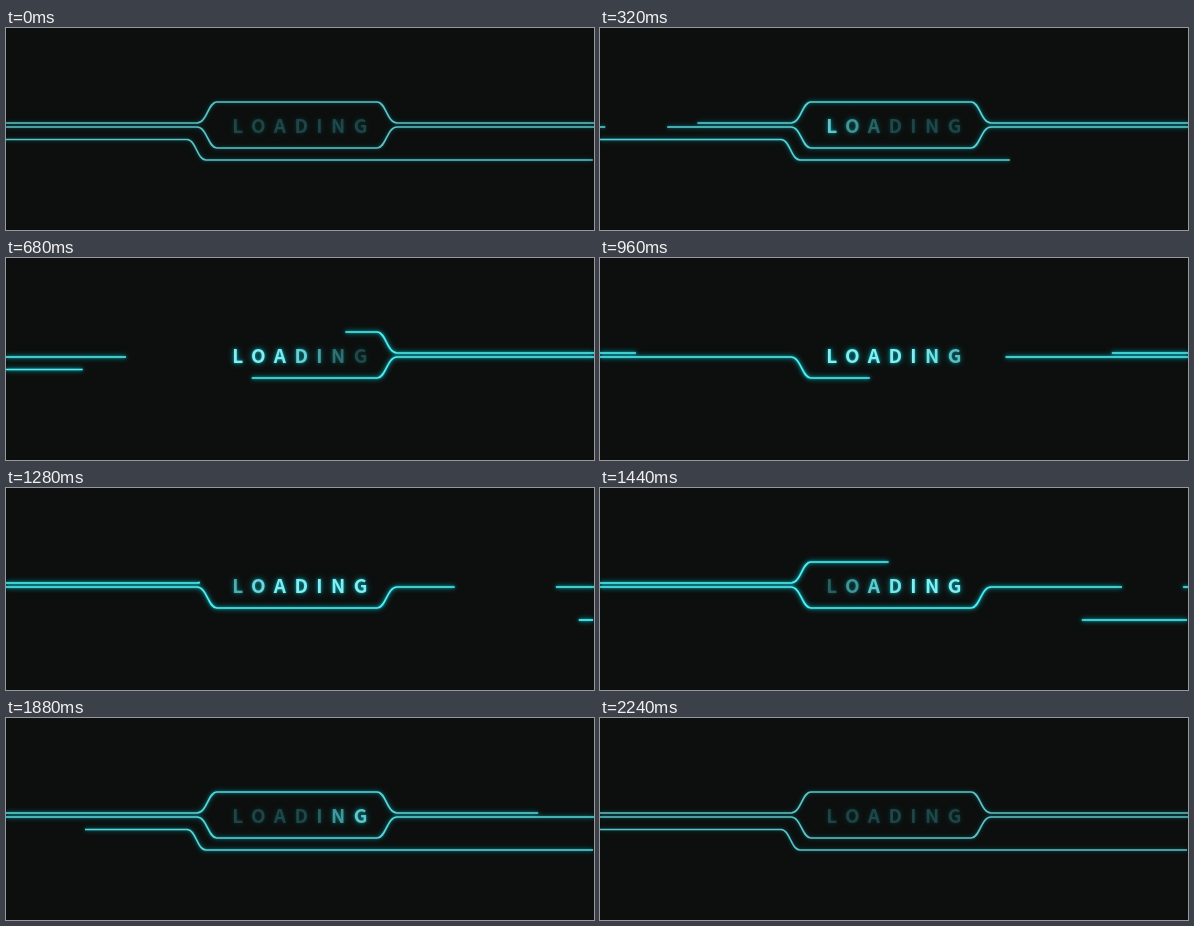
Write an HTML page that moves like this. It is 588 px wide and 202 px high and loops after 2.4 s.

```html
<!DOCTYPE html>
<html lang="en">
<head>
<meta charset="utf-8">
<title>Loading</title>
<style>
  html, body { margin: 0; width: 100%; height: 100%; overflow: hidden; background: #0c0f0e; }
  svg { display: block; }
  path { fill: none; stroke-width: 1.7; }
  text {
    font: bold 19px "Noto Sans CJK SC", "Noto Sans CJK JP", "Noto Sans CJK", "Open Sans", sans-serif;
    letter-spacing: 8.4px;
    fill: #86eef2;
    filter: drop-shadow(0 0 1.5px rgba(0, 205, 215, .7)) drop-shadow(0 0 3px rgba(0, 205, 215, .5));
  }
</style>
</head>
<body>
<svg width="588" height="202" viewBox="0 0 588 202">
  <g id="lines">
    <path pathLength="1" d="M0 95H191C201 95 202 74 211 74H371C380 74 381 95 391 95H588"/>
    <path pathLength="1" d="M0 99H191C201 99 202 120 211 120H371C380 120 381 99 391 99H588"/>
    <path pathLength="1" d="M587 132H200C191 132 190 111.5 181 111.5H0"/>
  </g>
  <text id="label" x="226.3" y="105"></text>
</svg>
<script>
const LOOP = 2400, STEP = 40;
const lines = document.getElementById('lines');
const label = document.getElementById('label');

// Per line: erase start, erase duration, redraw start, redraw duration (ms)
const timing = [
  [-10, 1260, 738, 1420],
  [-12, 1540, 229, 1540],
  [-10, 900, 1191, 903],
];

const letters = [...'LOADING'].map(ch => {
  const span = document.createElementNS('http://www.w3.org/2000/svg', 'tspan');
  span.textContent = ch;
  return label.appendChild(span);
});

// Sine ease from 0 to 1
function ease(t, start, duration) {
  const u = Math.min(1, Math.max(0, (t - start) / duration));
  return (1 - Math.cos(Math.PI * u)) / 2;
}

const mix = (a, b, k) => a + (b - a) * k;

function draw(t) {
  timing.forEach(([outAt, outFor, inAt, inFor], i) => {
    const tail = ease(t, outAt, outFor);
    const head = ease(t, inAt, inFor);
    lines.children[i].setAttribute('stroke-dasharray', `${head} ${tail - head} 2`);
  });

  const pulse = ease(t, 0, 800) - ease(t, 1500, 720);
  const glow = k => `rgba(0, 210, 220, ${mix(0.35, 1, pulse) * k})`;
  lines.style.stroke = `rgb(${mix(98, 88, pulse)}, ${mix(192, 236, pulse)}, ${mix(197, 240, pulse)})`;
  lines.style.filter = `drop-shadow(0 0 1px ${glow(0.7)}) drop-shadow(0 0 2.5px ${glow(0.75)})`;

  letters.forEach((span, i) => {
    const local = t - i * 110;
    const lit = ease(local, -20, 560) - ease(local, 1000, 560);
    span.setAttribute('fill-opacity', mix(0.17, 1, lit));
  });
}

function frame() {
  const t = performance.now() % LOOP;
  draw(Math.floor(t / STEP) * STEP);
  requestAnimationFrame(frame);
}
frame();
</script>
</body>
</html>
```
